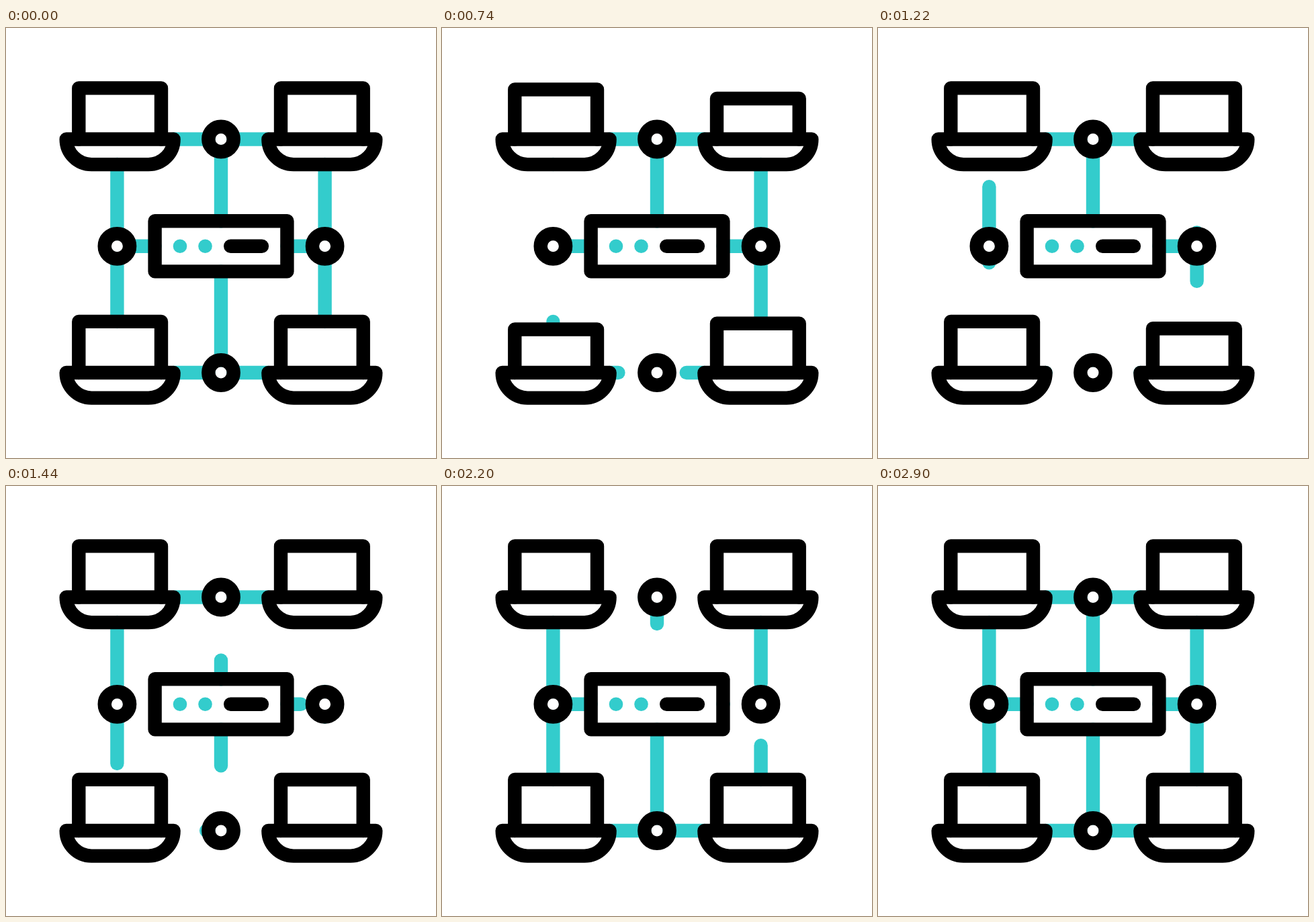
Recreate the animation shown at these times as an HTML page with a canvas. Size 640 px wide and 640 px high, loop 3 s.

```html
<!DOCTYPE html>
<html>
<head>
<meta charset="utf-8">
<style>
html, body { margin: 0; width: 100%; height: 100%; overflow: hidden; background: #fff; }
canvas { display: block; }
</style>
</head>
<body>
<canvas id="stage" width="640" height="640"></canvas>
<script>
const ctx = document.getElementById('stage').getContext('2d');
const LOOP = 3000, TRAVEL = 440;
const TEAL = '#33cccc';
const L = 165.4, R = 474.6, TOP = 165.5, MID = 324.8, BOTTOM = 513, CX = 320;

// Each link runs along its flow: x1, y1, x2, y2, drain start, refill start
const links = [
  [L, 306, L, 203, 15, 950],
  [L, 343.5, L, 437, 150, 1150],
  [CX, 362.5, CX, 494.3, 245, 1247],
  [301.4, BOTTOM, 249.6, BOTTOM, 447, 1370],
  [338.6, BOTTOM, 390.4, BOTTOM, 525, 1440],
  [221.5, MID, 184, MID, 732, 1740],
  [R, 203, R, 306, 815, 1860],
  [R, 437, R, 343.5, 960, 1969],
  [CX, 184, CX, 287.3, 1154, 2070],
  [456, MID, 418.5, MID, 1233, 2240],
  [249.6, TOP, 301.4, TOP, 1380, 2380],
  [390.4, TOP, 338.6, TOP, 1460, 2460]
];

// dx, dy, time of the deepest dip
const laptops = [
  [0, 0, 420],
  [0, 347.5, 588],
  [300.7, 0, 805],
  [300.7, 347.5, 1045]
];

const ease = x => (1 - Math.cos(Math.PI * Math.min(1, Math.max(0, x)))) / 2;
const dip = (t, peak) => 16.5 * ease(1 - Math.abs(t - peak) / 420);

function line(x1, y1, x2, y2) {
  ctx.beginPath();
  ctx.moveTo(x1, y1);
  ctx.lineTo(x2, y2);
  ctx.stroke();
}

function circle(x, y, r) {
  ctx.beginPath();
  ctx.arc(x, y, r, 0, 2 * Math.PI);
}

function drawLink([x1, y1, x2, y2, drain, refill], t) {
  const filling = t >= refill;
  const from = filling ? 0 : ease((t - drain) / TRAVEL);
  const to = filling ? ease((t - refill) / TRAVEL) : 1;
  const a = Math.min(from, 0.9999), b = Math.max(to, 0.0001);
  const dx = x2 - x1, dy = y2 - y1;
  line(x1 + dx * a, y1 + dy * a, x1 + dx * b, y1 + dy * b);
}

function drawLaptop([dx, dy, peak], t) {
  const top = 89.4 + dip(t, peak);
  ctx.save();
  ctx.translate(dx, dy);
  ctx.stroke(new Path2D(`M108.3 165.5V${top}H231V165.5`));
  ctx.stroke(new Path2D('M89.7 165.5H249.6A37.6 37.6 0 0 1 212 203.1H127.3A37.6 37.6 0 0 1 89.7 165.5Z'));
  ctx.restore();
}

function draw(t) {
  ctx.clearRect(0, 0, 640, 640);
  ctx.lineWidth = 20.4;
  ctx.lineCap = ctx.lineJoin = 'round';

  ctx.strokeStyle = ctx.fillStyle = TEAL;
  links.forEach(link => drawLink(link, t));
  for (const x of [259, 296.5]) {
    circle(x, MID, 10.3);
    ctx.fill();
  }

  ctx.strokeStyle = '#000';
  laptops.forEach(laptop => drawLaptop(laptop, t));
  ctx.strokeRect(221.6, 287.2, 196.8, 75.2);
  line(334.2, MID, 380.9, MID);
  for (const [x, y] of [[CX, TOP], [CX, BOTTOM], [L, MID], [R, MID]]) {
    circle(x, y, 18.7);
    ctx.stroke();
  }
}

const start = performance.now();
function tick() {
  draw((performance.now() - start) % LOOP);
  requestAnimationFrame(tick);
}
tick();
</script>
</body>
</html>
```
